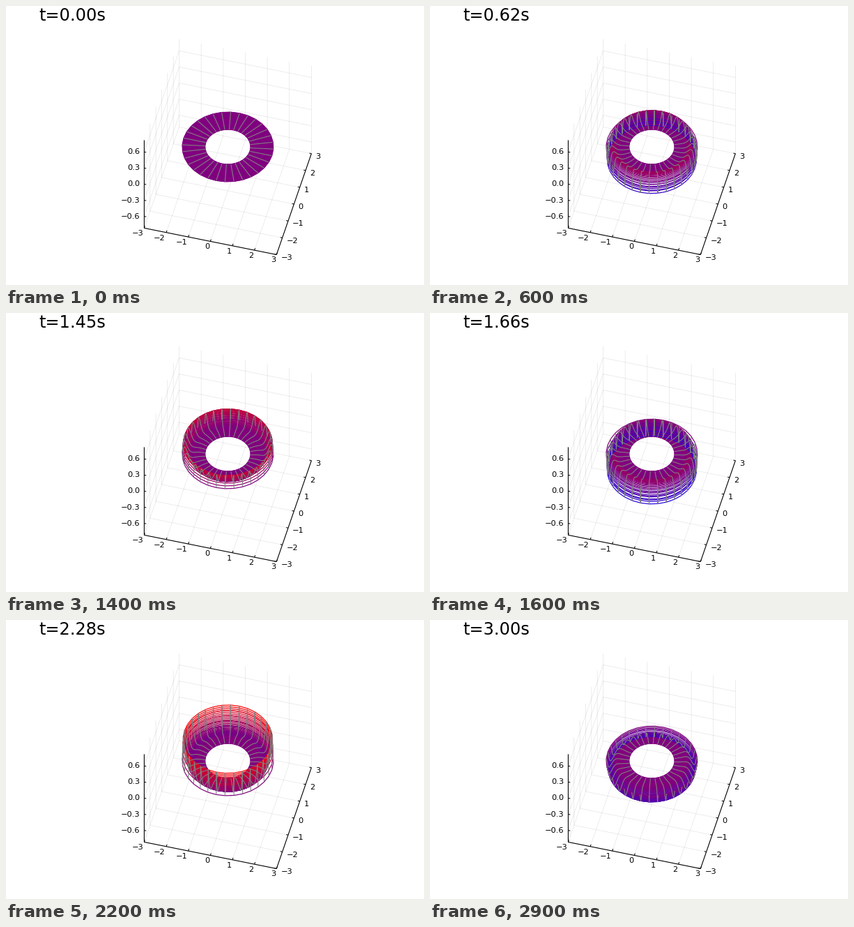
Recreate the animation shown at these times as a matplotlib script. Size 600 by 400 pixels, loop 3 s.

```python
import numpy as np
import matplotlib.pyplot as plt
from matplotlib.animation import FuncAnimation
from matplotlib.collections import LineCollection

W, H, DPI = 600, 400, 100
PX = 72 / DPI
FRAMES, DURATION = 30, 3.0
INNER, OUTER, RINGS, SPOKES = 1.0, 2.0, 101, 32
Z_TOP = 0.818
VISCOSITY, AMPLITUDE, LAG = 0.05, 0.405, 0.15
DRIVEN = RINGS - 5
SUBSTEPS = 120

plt.rcParams["font.family"] = "DejaVu Sans"
plt.rcParams["path.simplify"] = False

fig = plt.figure(figsize=(W / DPI, H / DPI), dpi=DPI, facecolor="white")
ax = fig.add_axes([0, 0, 1, 1])
ax.set_xlim(0, W)
ax.set_ylim(H, 0)
ax.axis("off")


def project(x, y, z):
    """Map a point of the 3D box to stage pixels."""
    sx = 318.4 + 31.65 * x + 8.35 * y
    sy = 202.0 + 6.35 * x - 24.15 * y - 77.0 * z
    return np.stack(np.broadcast_arrays(sx, sy), axis=-1)


def add_lines(pairs, color, width, alpha=1.0, order=1):
    segments = [[project(*p), project(*q)] for p, q in pairs]
    lines = LineCollection(segments, colors=color, alpha=alpha,
                           linewidths=width * PX, zorder=order)
    lines.set_snap(False)
    ax.add_collection(lines)


def label(x, y, text, ha):
    ax.text(x, y, text.replace("-", "\u2212"), ha=ha, va="center_baseline",
            fontsize=11.4 * PX)


def draw_box():
    ticks = range(-3, 4)
    heights = [-0.6, -0.3, 0.0, 0.3, 0.6]
    lo, hi = -Z_TOP, Z_TOP
    grid = []
    for v in ticks:
        grid += [((v, -3, lo), (v, 3, lo)), ((v, 3, lo), (v, 3, hi)),
                 ((-3, v, lo), (3, v, lo))]
        if v < 3:
            grid.append(((-3, v, lo), (-3, v, hi)))
    for z in heights:
        grid += [((-3, -3, z), (-3, 3, z)), ((-3, 3, z), (3, 3, z))]
    add_lines(grid, "black", 0.7, 0.1)

    axes = [((-3, -3, lo), (3, -3, lo)), ((3, -3, lo), (3, 3, lo)),
            ((-3, -3, lo), (-3, -3, hi))]
    add_lines(axes, "black", 1.1, order=2)

    marks = [((v, -3, lo), (v, -2.88, lo)) for v in ticks]
    marks += [((3, v, lo), (2.91, v, lo)) for v in ticks]
    marks += [((-3, -3, z), (-2.91, -3, z)) for z in heights]
    add_lines(marks, "black", 1, order=2)

    for v in ticks:
        x, y = project(v, -3, lo)
        label(x - 1.2, y + 7, str(v), "right")
        x, y = project(3, v, lo)
        label(x + 6, y + 3.3, str(v), "left")
    for z in heights:
        x, y = project(-3, -3, z)
        label(x - 6.5, y - 0.9, f"{z:.1f}", "right")


def simulate(r):
    """Diffuse the swing of one driven ring between two fixed rims."""
    dr = r[1] - r[0]
    dt = DURATION / (FRAMES - 1) / SUBSTEPS
    u = np.zeros_like(r)
    history = [u.copy()]
    for step in range(1, (FRAMES - 1) * SUBSTEPS + 1):
        bend = (u[2:] - 2 * u[1:-1] + u[:-2]) / dr**2
        slope = (u[2:] - u[:-2]) / (2 * dr)
        u[1:-1] += dt * VISCOSITY * (bend + slope / r[1:-1])
        phase = max(2 * np.pi * step * dt - LAG, 0)
        u[DRIVEN] = AMPLITUDE * np.sin(phase)
        if step % SUBSTEPS == 0:
            history.append(u.copy())
    return history


radii = np.linspace(INNER, OUTER, RINGS)
angles = np.linspace(0, 2 * np.pi, SPOKES + 1)
ring_x = radii[:, None] * np.cos(angles)
ring_y = radii[:, None] * np.sin(angles)
heights_at = simulate(radii)

draw_box()
title = ax.text(47, 20.9, "", fontsize=24 * PX, va="baseline", ha="left")
rings = LineCollection([], linewidths=1.2 * PX, zorder=3)
spokes = LineCollection([], colors="#808080", linewidths=1.1 * PX, zorder=4)
ax.add_collection(rings)
ax.add_collection(spokes)


def update(i):
    t = i * DURATION / (FRAMES - 1)
    z = heights_at[i]
    mesh = project(ring_x, ring_y, z[:, None])
    warm = np.clip(0.5 + z / 0.8, 0, 1)
    rings.set_segments(list(mesh))
    rings.set_color(np.column_stack([warm, 0 * warm, 1 - warm]))
    spokes.set_segments(list(mesh[:, :-1].swapaxes(0, 1)))
    title.set_text(f"t={t:.2f}s")
    return rings, spokes, title


anim = FuncAnimation(fig, update, frames=FRAMES, interval=100, repeat=True,
                     repeat_delay=0, blit=False)
plt.show()
```
